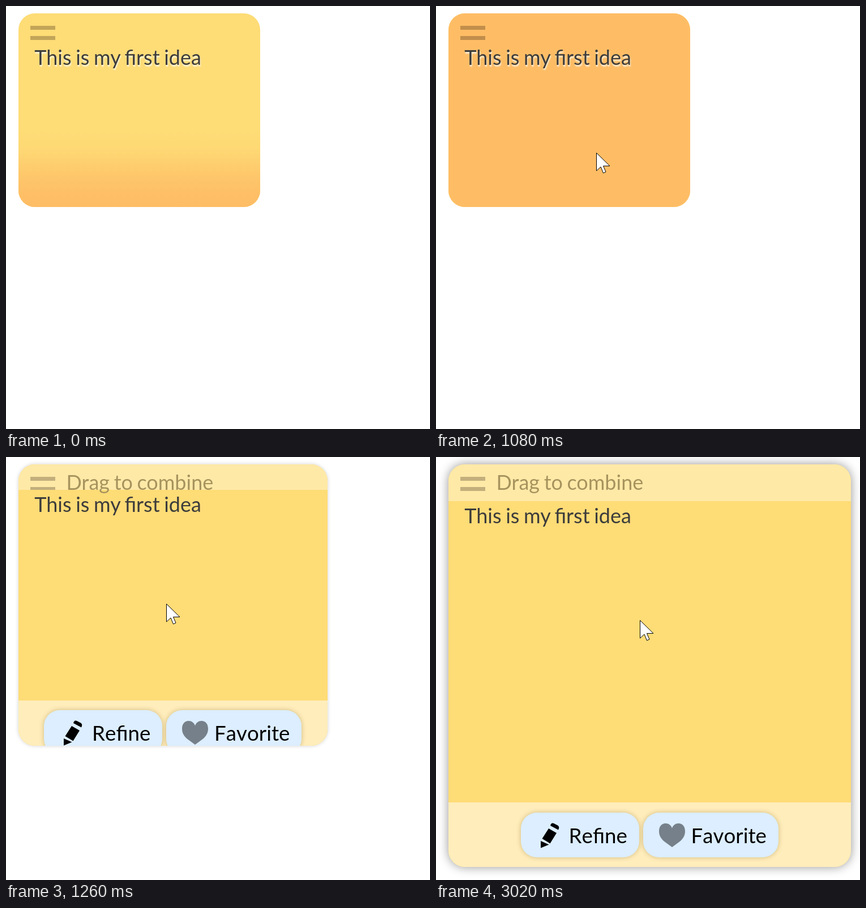
These frames come from a looping animation (749x747 px, 3.1 s). An HTML page:

```html
<!DOCTYPE html>
<html lang="en">
<head>
<meta charset="utf-8">
<title>Idea card</title>
<style>
  html, body { margin: 0; width: 100%; height: 100%; overflow: hidden; background: #fff; }
  #stage { position: relative; width: 749px; height: 747px; overflow: hidden; font: 36px/44px Lato, sans-serif; word-spacing: -1.6px; }
  #stage * { position: absolute; box-sizing: border-box; }
  #card { left: 22px; top: 13px; border-radius: 29px; background: #fedc76; overflow: hidden; }
  #glow {
    left: 0; width: 100%; height: 800px;
    background: linear-gradient(#febd6500, #febd6518 30px, #febd656b 58px, #febd65b8 84px, #febd65f0 112px, #febd65 135px);
  }
  #head { left: 0; top: 0; width: 100%; overflow: hidden; }
  #head i { left: 20.5px; width: 44px; height: 7px; background: rgba(20, 10, 0, .26); }
  #head i:first-child { top: 21.7px; }
  #head i:last-child { top: 39.7px; }
  .open #head { background: #ffe9a7; }
  .text { white-space: nowrap; }
  #drag { left: 84.6px; top: 9px; color: #a6935d; }
  #idea { left: 28.3px; color: #3c3c3c; text-shadow: 1px 3px 2px rgba(255, 255, 255, .75); }
  .open #idea { text-shadow: none; }
  #bar { left: 0; bottom: 0; width: 100%; background: #ffedbb; }
  .button {
    top: 17.5px; height: 79px; border-radius: 28px; background: #dceeff; color: #000;
    font-size: 36.7px; font-kerning: none;
    box-shadow: 0 0 8px rgba(110, 80, 0, .32);
  }
  .button svg { left: 0; top: 0; width: 80px; height: 79px; }
  .button .text { left: 84.6px; top: 18px; }
  #refine { width: 208.5px; }
  #favorite { width: 239px; }
  #drag, #bar { visibility: hidden; }
  .open #drag, .open #bar { visibility: visible; }
  .open #glow { visibility: hidden; }
  #cursor { left: 0; top: 0; width: 30px; height: 40px; overflow: visible; }
</style>
</head>
<body>
<div id="stage">
  <div id="card">
    <div id="glow"></div>
    <div id="head"><i></i><i></i></div>
    <div id="drag" class="text">Drag to combine</div>
    <div id="idea" class="text">This is my first idea</div>
    <div id="bar">
      <div id="refine" class="button">
        <svg><path d="M35 50L49.5 56.5L35 62.5ZM49 28L63 36L51.5 54.5L37.5 46ZM52 23Q53.5 17 58 19L65 22.5Q69 25 66 30.5Z"/></svg>
        <span class="text">Refine</span>
      </div>
      <div id="favorite" class="button">
        <svg><path fill="#76808a" d="M51 61L38 51.5C31 46 28 40 28 33C28 24 33 19 39.5 19C45 19 49 22 51 27.5C53 22 57 19 62.5 19C69 19 74 24 74 33C74 40 71 46 64 51.5Z"/></svg>
        <span class="text">Favorite</span>
      </div>
    </div>
  </div>
  <svg id="cursor"><path d="M0 0V31.5L7.5 24.5L12 35.5L16.5 33.5L12 23H23.5Z" fill="#fff" stroke="#000"/></svg>
</div>
<script>
const LOOP = 3100;

// at: start time; cursor: tip position; glow: upward shift; open: expansion 0..1
const steps = [
  { at: 0 },
  { at: 760, cursor: [451.5, 548.5] },
  { at: 840, cursor: [365.5, 417.5] },
  { at: 920, cursor: [283.5, 259.5], glow: 50 },
  { at: 1000, cursor: [283.5, 259.5], glow: 190 },
  { at: 1080, cursor: [283.5, 259.5], glow: 360 },
  { at: 1170, cursor: [283.5, 259.5], open: 0 },
  { at: 1260, cursor: [283.5, 259.5], open: 0.42 },
  { at: 1330, cursor: [283.5, 259.5], open: 0.76 },
  { at: 1410, cursor: [283.5, 259.5], open: 1 },
  { at: 3020, cursor: [360.5, 288.5], open: 1 }
];

const $ = id => document.getElementById(id);
const [card, glow, head, idea, bar, refine, favorite, cursor] =
  ["card", "glow", "head", "idea", "bar", "refine", "favorite", "cursor"].map($);
const px = n => n + "px";

function draw({ cursor: tip, glow: shift = 0, open }) {
  const isOpen = open !== undefined;
  const p = open || 0;
  const mix = (a, b) => a + (b - a) * p;
  const width = mix(426.5, 711);

  card.className = isOpen ? "open" : "";
  card.style.width = px(width);
  card.style.height = px(mix(341.5, 711));
  card.style.boxShadow = p ? `0 0 ${18 * p}px rgba(0, 0, 0, ${0.42 * p})` : "none";

  glow.style.top = px(207 - shift);
  head.style.height = px(isOpen ? mix(30.5, 65) : 65);
  idea.style.top = px(isOpen ? mix(33.5, 68) : 55);
  bar.style.height = px(mix(55, 114));

  const left = Math.max(1.5, width / 2 - 227.5);
  refine.style.left = px(left);
  favorite.style.left = px(left + 216);

  cursor.style.visibility = tip ? "visible" : "hidden";
  if (tip) cursor.style.transform = `translate(${px(tip[0])}, ${px(tip[1])})`;
}

let shown;
const start = performance.now();
function tick() {
  const t = (performance.now() - start) % LOOP;
  const step = steps.filter(s => s.at <= t).pop();
  if (step !== shown) draw(shown = step);
  requestAnimationFrame(tick);
}
tick();
</script>
</body>
</html>
```
